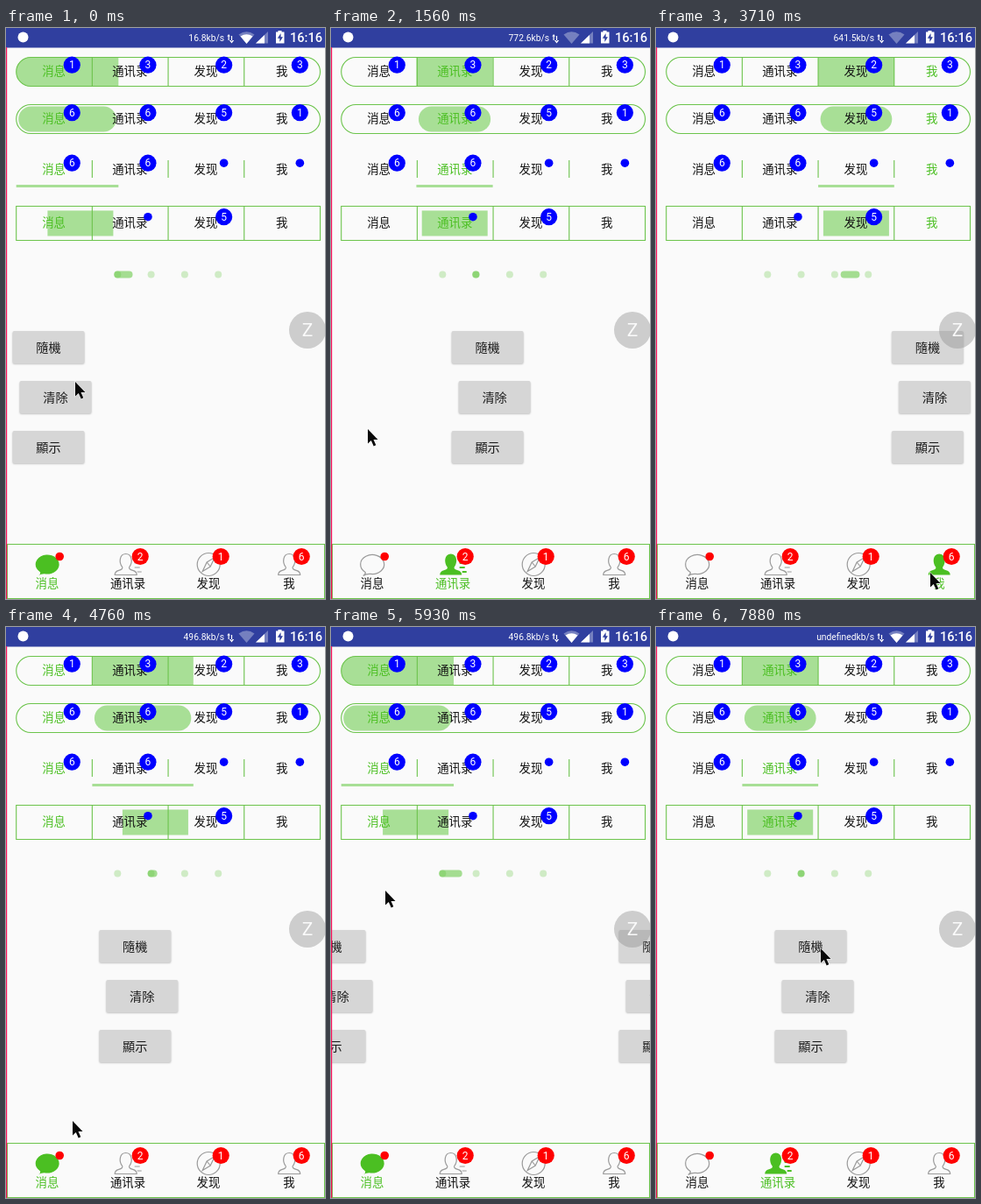
Write an HTML page with a canvas that moves like this. It is 364x652 px and loops after 8000 ms.

```html
<!DOCTYPE html>
<html lang="zh">
<head>
<meta charset="utf-8">
<title>Pager indicators</title>
<style>
  html, body { margin: 0; width: 100%; height: 100%; overflow: hidden; background: #fafafa; }
  canvas { display: block; }
</style>
</head>
<body>
<canvas id="stage" width="364" height="652"></canvas>
<script>
const ctx = document.getElementById('stage').getContext('2d');
const LOOP = 8000;
const STEP = 120;
const PAGE_WIDTH = 371;
const SETTLE_TIME = 400;
const TAP_LEAD = 74;
const LEFT = 11.7;
const SEGMENT = 86.7;
const WIDTH = 4 * SEGMENT;
const GREEN = '#4bbf22';
const LINE = '#6cc44c';
const FILL = 'rgba(78,192,40,.48)';
const SC = '"Noto Sans CJK SC", "Noto Sans CJK", sans-serif';
const TC = '"Noto Sans CJK TC", "Noto Sans CJK", sans-serif';
const LATIN = 'Roboto, sans-serif';
const TITLES = ['消息', '通讯录', '发现', '我'];
const BUTTONS = ['隨機', '清除', '顯示'];
const SPEEDS = ['16.8', '772.6', '641.5', '496.8', '805.6'];

// A drag follows the pointer from its grab point; a fling or tap settles on a tab.
// `lag` is how late the tab rows repaint after a tap.
const PHASES = [
  { at: 0, tab: 0, grab: 207 },
  { at: 1320, tab: 1, from: .445 },
  { at: 2890, tab: 2, from: 1, lead: TAP_LEAD, lag: 14 },
  { at: 3710, tab: 3, from: 2, lead: TAP_LEAD, lag: TAP_LEAD },
  { at: 4760, tab: 0, from: 3, lead: TAP_LEAD, lag: 14 },
  { at: 5690, tab: 0, grab: 240 },
  { at: 6740, tab: 1, from: .72 }
];

const POINTER_STOPS = [
  { at: 0, x: 79, y: 404 },
  { at: 1320, x: 42, y: 458 },
  { at: 1560, x: 42, y: 458 },
  { at: 2890, x: 222, y: 624 },
  { at: 3610, x: 313, y: 622 },
  { at: 3710, x: 313, y: 622 },
  { at: 4640, x: 58, y: 624 },
  { at: 4760, x: 76, y: 564 },
  { at: 5690, x: 240, y: 320 },
  { at: 5930, x: 62, y: 301 },
  { at: 6740, x: -27, y: 300 },
  { at: 7820, x: 188, y: 367 }
];

const mix = (a, b, u) => a + (b - a) * u;
const clamp = u => Math.min(1, Math.max(0, u));
const smooth = u => u * u * (3 - 2 * u);
const easeOut = u => 1 - (1 - u) ** 5;
const latest = (list, t) => list.findLast(item => item.at <= t);

function pointerAt(t) {
  const a = latest(POINTER_STOPS, t);
  const b = POINTER_STOPS[POINTER_STOPS.indexOf(a) + 1] || a;
  const u = a === b ? 0 : smooth((t - a.at) / (b.at - a.at));
  return { x: mix(a.x, b.x, u), y: mix(a.y, b.y, u) };
}

function pageAt(phase, t, lag = 0) {
  if (phase.grab) return (phase.grab - pointerAt(t).x) / PAGE_WIDTH;
  const elapsed = t - phase.at + (phase.lead || 0) - lag;
  return mix(phase.from, phase.tab, easeOut(clamp(elapsed / SETTLE_TIME)));
}

// The leading edge is linear; the trailing edge waits for the second half.
function stretch(page) {
  const base = Math.floor(page), part = page - base;
  return { from: base + Math.max(0, 2 * part - 1), to: base + part };
}

function text(value, x, y, font, color, align = 'center') {
  ctx.font = font;
  ctx.fillStyle = color;
  ctx.textAlign = align;
  ctx.fillText(value, x, y);
}

function circle(x, y, r, color) {
  ctx.beginPath();
  ctx.arc(x, y, r, 0, Math.PI * 2);
  ctx.fillStyle = color;
  ctx.fill();
}

function fillRound(x, y, w, h, r, color) {
  ctx.beginPath();
  ctx.roundRect(x, y, w, h, r);
  ctx.fillStyle = color;
  ctx.fill();
}

function strokeRound(x, y, w, h, r) {
  ctx.beginPath();
  ctx.roundRect(x, y, w, h, r);
  ctx.strokeStyle = LINE;
  ctx.lineWidth = 1.1;
  ctx.stroke();
}

// A badge is a number, '.' for a plain dot, or ' ' for none.
function badge(mark, x, y, color) {
  if (mark === ' ') return;
  circle(x, y, mark === '.' ? 4.8 : 9.6, color);
  if (mark !== '.') text(mark, x, y + 4.2, '12px ' + LATIN, '#fff');
}

function dividers(y, h) {
  ctx.fillStyle = LINE;
  for (let i = 1; i < 4; i++) ctx.fillRect(LEFT + i * SEGMENT - .6, y, 1.1, h);
}

function labels(selected, middle, badges) {
  TITLES.forEach((title, i) => {
    const x = LEFT + (i + .5) * SEGMENT;
    text(title, x - .5, middle + 4.6, '500 13.4px ' + SC, i === selected ? GREEN : '#111');
    badge(badges[i], x + 20.2, middle - 6.8, '#00f');
  });
}

function drawTabRows(page, selected) {
  const span = stretch(page);
  const x = LEFT + span.from * SEGMENT;
  const w = (span.to - span.from + 1) * SEGMENT;

  ctx.save();
  ctx.beginPath();
  ctx.roundRect(LEFT, 33.5, WIDTH, 33, 16.5);
  ctx.clip();
  ctx.fillStyle = FILL;
  ctx.fillRect(x, 33, w, 34);
  ctx.restore();
  strokeRound(LEFT, 33.5, WIDTH, 33, 16.5);
  dividers(33.5, 33);
  labels(selected, 49, '1323');

  fillRound(x + 2.5, 89.5, w - 5, 29, 14.5, FILL);
  strokeRound(LEFT, 87.5, WIDTH, 33, 16.5);
  labels(selected, 103.5, '6651');

  ctx.fillStyle = FILL;
  ctx.fillRect(x, 179, w, 3);
  dividers(151, 20);
  labels(selected, 161, '66..');

  ctx.fillStyle = FILL;
  ctx.fillRect(LEFT + page * SEGMENT + 5.8, 208.5, 75, 29);
  strokeRound(LEFT, 203.5, WIDTH, 39, 0);
  dividers(203.5, 39);
  labels(selected, 222.5, ' .5 ');
}

function drawDots(page) {
  const gap = 38.3, span = stretch(page);
  for (let i = 0; i < 4; i++) circle(127.3 + i * gap, 281.5, 4, 'rgba(78,192,40,.25)');
  fillRound(123.3 + span.from * gap, 277.5, 8 + (span.to - span.from) * gap, 8, 4, 'rgba(78,192,40,.5)');
}

function drawButtons(page) {
  for (let i = 0; i < 4; i++) {
    const left = 135.5 + (i - page) * PAGE_WIDTH;
    BUTTONS.forEach((name, row) => {
      const x = left + (row === 1 ? 8 : 0), y = 346 + row * 57;
      ctx.save();
      ctx.shadowColor = 'rgba(0,0,0,.22)';
      ctx.shadowBlur = 2;
      ctx.shadowOffsetY = 1;
      fillRound(x, y, 82, 37, 2, '#d6d6d6');
      ctx.restore();
      text(name, x + 41, y + 23.6, '500 14.2px ' + TC, '#1c1c1c');
    });
  }
}

function drawFloatingButton() {
  circle(344, 345, 21, 'rgba(140,140,140,.42)');
  text('Z', 344, 352.3, '21px ' + LATIN, 'rgba(255,255,255,.9)');
}

const BUBBLE = new Path2D('M-8 8.9A13.5 11 0 1 1-2 10.9Q-7 10.5-10.5 13Q-7.5 11-8 8.9Z');
const PERSON = new Path2D('M-12.5 12Q-12.5 8-8 6.8Q-3 5.5-4 3C-8-2-7.5-12 0-12C7.5-12 8-2 4 3Q3 5.5 8 6.8Q12.5 8 12.5 12Z');
const CARD_LINES = new Path2D('M10-1.5H18M10 3.5H16M13 8.5H18');
const RING = new Path2D('M13 0A13 13 0 1 1-13 0A13 13 0 1 1 13 0Z');
const NEEDLE = new Path2D('M7-8L2 2.5L-7 8L-2-2.5ZM-2-2.5L2 2.5');
const ICONS = [BUBBLE, PERSON, RING, PERSON];

function drawIcon(index, on) {
  ctx.strokeStyle = ctx.fillStyle = on ? GREEN : '#9a9a9a';
  ctx.lineWidth = 1.2;
  if (on) ctx.fill(ICONS[index]);
  else ctx.stroke(ICONS[index]);
  if (on) ctx.lineWidth = 2;
  if (index === 1) ctx.stroke(CARD_LINES);
  if (index === 2) {
    if (on) ctx.strokeStyle = '#fff';
    ctx.stroke(NEEDLE);
  }
}

function drawBottomBar(selected) {
  strokeRound(1.5, 589.5, 362, 62, 0);
  TITLES.forEach((title, i) => {
    const x = 47.2 + i * 92, on = i === selected;
    ctx.save();
    ctx.translate(i === 1 ? x - 2.5 : x, 612.5);
    drawIcon(i, on);
    ctx.restore();
    text(title, x - .2, 639, '500 13.4px ' + SC, on ? GREEN : '#111');
    badge('.216'[i], x + 14, 603.5, '#f00');
  });
}

function shape(path, color) {
  ctx.fillStyle = color;
  ctx.fill(new Path2D(path));
}

function drawStatusBar(t) {
  const dim = '#7580bf';
  ctx.fillStyle = '#303f9f';
  ctx.fillRect(0, 0, 364, 22.5);
  circle(19.5, 10.5, 6, '#fff');
  const reading = SPEEDS[Math.floor((t + 1200) / 1800)];
  text(reading + 'kb/s', 249, 14.5, '10.3px ' + LATIN, '#fff', 'right');
  shape('M253.5 8H254.7V14H253.5ZM252.3 9.5L254.1 7L255.9 9.5ZM256.9 9H258.1V15H256.9ZM254.8 14L257.5 17.5L260.2 14Z', '#fff');
  shape('M265.5 7.5Q274.5 1 283.5 7.5L274.5 18Z', dim);
  if (t < 600 || t >= 5660) shape('M267.5 9.5Q274.5 5 281.5 9.5L274.5 18Z', '#fff');
  shape('M299 4V17.5H285Z', dim);
  shape('M295 8V17.5H285Z', '#fff');
  shape('M308 4.5H310.5V3H314.5V4.5H317.5V17.5H308Z', '#fff');
  shape('M313.6 6L309.8 11.7H312.3V16L316 10.2H313.6Z', '#303f9f');
  text('16:16', 361, 15.8, '500 14.6px ' + LATIN, '#fff', 'right');
}

const ARROW = new Path2D('M0 0V16.5L3.8 13L6.7 19.5L9.3 18.3L6.5 12H11.5Z');

function drawPointer({ x, y }) {
  ctx.save();
  ctx.translate(x, y);
  ctx.strokeStyle = 'rgba(255,255,255,.75)';
  ctx.lineWidth = 1.2;
  ctx.stroke(ARROW);
  ctx.fillStyle = '#080808';
  ctx.fill(ARROW);
  ctx.restore();
}

function draw(now) {
  const phase = latest(PHASES, now);
  const t = phase.at + Math.floor((now - phase.at) / STEP) * STEP;
  const page = pageAt(phase, t);
  ctx.fillStyle = '#fafafa';
  ctx.fillRect(0, 0, 364, 652);
  drawTabRows(pageAt(phase, t, phase.lag), phase.tab);
  drawDots(page);
  drawButtons(page);
  drawFloatingButton();
  drawBottomBar(phase.tab);
  drawStatusBar(t);
  ctx.fillStyle = '#f8145c';
  ctx.fillRect(0, 22, 1.2, 630);
  drawPointer(pointerAt(t));
}

const start = performance.now();
function tick() {
  draw((performance.now() - start) % LOOP);
  requestAnimationFrame(tick);
}
tick();
</script>
</body>
</html>
```
